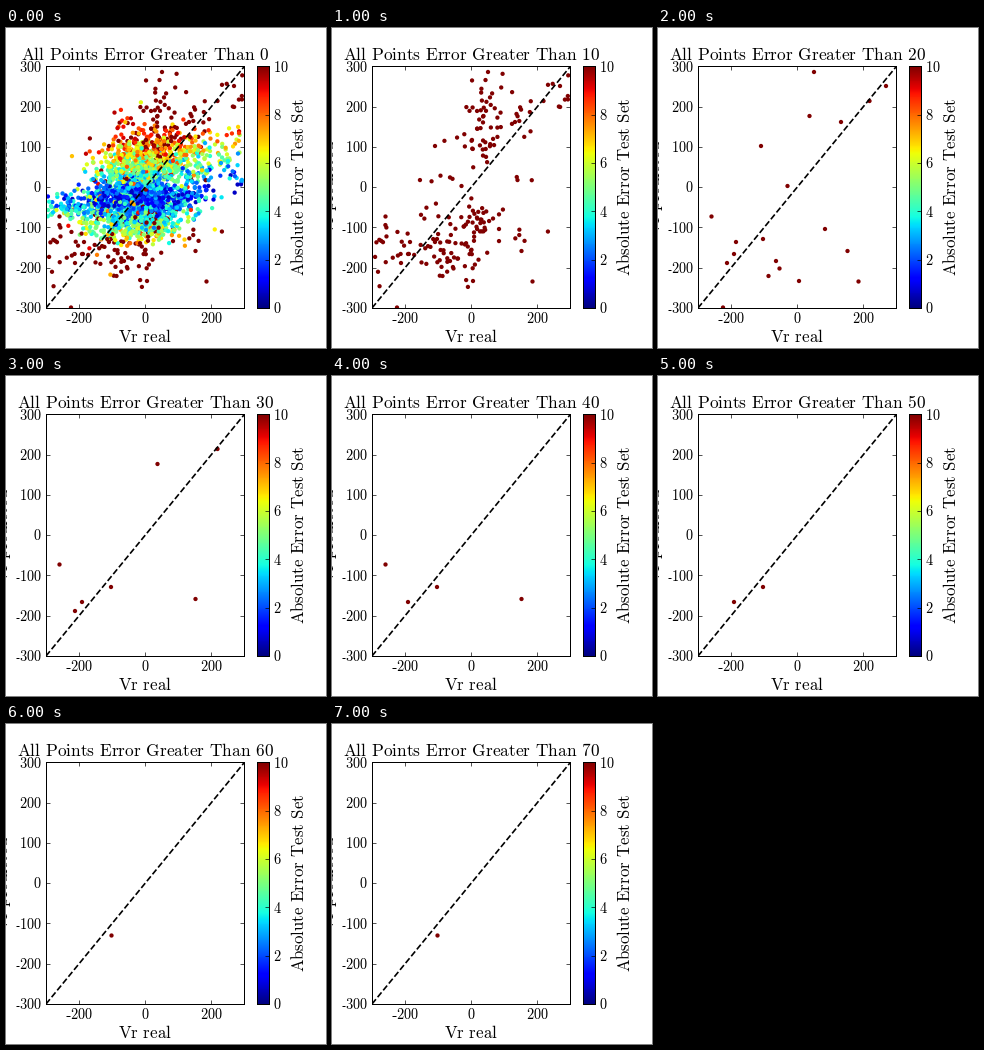
A matplotlib script that plays this animation: 320x320 px, repeating every 8000 ms.

```python
import numpy as np
import matplotlib.pyplot as plt
from matplotlib.animation import FuncAnimation
from matplotlib.lines import Line2D

SIZE = 320
PT = 72 / 80  # points per pixel
LEFT, RIGHT, TOP, BOTTOM = 40, 238.4, 38.4, 280
MID_X, MID_Y = (LEFT + RIGHT) / 2, (TOP + BOTTOM) / 2
BAR_LEFT, BAR_WIDTH = 251.2, 12.08
STEP = 10

plt.rcParams["mathtext.fontset"] = "cm"

# Key points in pixels, grouped by their error
KEY_POINTS = {
    75: [(105, 211)],
    55: [(76, 226)],
    45: [(53.5, 188.5), (189.5, 223)],
    35: [(151.5, 88), (211.5, 73), (69, 235)],
    25: [(156, 44), (228, 58), (183, 94), (103, 118), (129.5, 158),
         (78, 214), (118, 233), (121.5, 240.5), (110.5, 248), (141, 253),
         (167, 201), (200.5, 253.5), (65, 279.5)],
}

rng = np.random.default_rng(7)


def blob(n, x, sx, y, sy, slope=0):
    """Normal cloud whose centre line rises or falls with x."""
    px = rng.normal(x, sx, n)
    return np.column_stack([px, rng.normal(y, sy, n) + slope * (px - x)])


def strip(n, x0, x1, y, sy, slope=0):
    """Cloud spread evenly from x0 to x1."""
    px = rng.uniform(x0, x1, n)
    middle = (x0 + x1) / 2
    return np.column_stack([px, rng.normal(y, sy, n) + slope * (px - middle)])


def with_error(points, error):
    return np.column_stack([points, np.broadcast_to(error, len(points))])


def small_errors():
    points = np.vstack([
        blob(700, 139, 27, 169, 7),
        blob(850, 142, 27, 137, 17, -0.2),
        blob(560, 130, 25, 192, 11),
        strip(120, 41, 100, 181, 6),
        strip(90, 178, 237, 130, 19),
    ])
    x, y = points.T
    inside = (y > 90) & (y < 220) & (x > 41) & (x < 237)
    points = points[inside]
    x, y = points.T
    centre = 170 - 0.2 * np.maximum(x - 170, 0)
    error = 1.4 + np.abs(y - centre) / 8.5 + 0.02 * np.maximum(100 - x, 0)
    error += rng.normal(0, 1.3, len(x))
    return with_error(points, np.clip(error, 0.6, 9.9))


def medium_errors():
    return np.vstack([
        strip(24, 165, 237, 84, 14, -0.45),
        blob(24, 147, 13, 116, 10),
        blob(22, 149, 9, 82, 18),
        strip(9, 80, 200, 153, 6),
        blob(30, 146, 12, 190, 9),
        blob(46, 128, 21, 222, 17),
        strip(32, 42, 108, 217, 25),
        strip(6, 165, 230, 210, 12),
    ])


def build_points():
    fringe = blob(90, 136, 34, 155, 38, -0.2)
    return rng.permutation(np.vstack([
        small_errors(),
        with_error(fringe, rng.uniform(6, 9.9, len(fringe))),
        with_error(medium_errors(), 15),
        *[with_error(group, error) for error, group in KEY_POINTS.items()],
    ]))


def roman(text):
    return r"$\mathrm{" + text.replace(" ", r"\hspace{0.38}") + "}$"


def label(x, y, text, size, ha="center", rotation=0):
    return fig.text(x / SIZE, 1 - y / SIZE, roman(text), fontsize=size * PT,
                    ha=ha, va="baseline", rotation=rotation,
                    rotation_mode="anchor")


def number(x, y, value, ha, size=14.4):
    """Tick label with a short hyphen for negative values."""
    hyphen = size / 3
    if value < 0 and ha == "center":
        x += hyphen / 2
    label(x, y, str(abs(value)), size, ha)
    if value < 0:
        width = 1.5 * size
        start = x - (width if ha == "right" else width / 2) - hyphen
        level = 1 - (y - 0.216 * size) / SIZE
        fig.add_artist(Line2D(
            [(start + 0.1) / SIZE, (start + 0.8 * hyphen) / SIZE],
            [level, level], color="black", lw=PT, solid_capstyle="butt"))


def box(left, width):
    axes = fig.add_axes([left / SIZE, 1 - BOTTOM / SIZE,
                         width / SIZE, (BOTTOM - TOP) / SIZE])
    for spine in axes.spines.values():
        spine.set_linewidth(PT)
    axes.tick_params(direction="in", length=4, width=0.6,
                     labelleft=False, labelright=False, labelbottom=False)
    return axes


fig = plt.figure(figsize=(4, 4), dpi=80, facecolor="white")

ax = box(LEFT, RIGHT - LEFT)
ax.set_xlim(LEFT, RIGHT)
ax.set_ylim(BOTTOM, TOP)
ax.tick_params(top=True, right=True)

x_values = range(-200, 201, 200)
y_values = range(-300, 301, 100)
x_ticks = [MID_X + v * (RIGHT - LEFT) / 600 for v in x_values]
y_ticks = [MID_Y - v * (BOTTOM - TOP) / 600 for v in y_values]
ax.set_xticks(x_ticks)
ax.set_yticks(y_ticks)
for x, v in zip(x_ticks, x_values):
    number(x, 295, v, "center")
for y, v in zip(y_ticks, y_values):
    number(36, y + 5.2, v, "right")

# Colour bar
bar = box(BAR_LEFT, BAR_WIDTH)
bar.imshow(np.linspace(0, 10, 256)[:, None], cmap="jet", origin="lower",
           extent=(0, 1, 0, 10), aspect="auto")
bar.set_xticks([])
bar.set_yticks(range(0, 11, 2))
bar.tick_params(left=False, right=True)
for v in range(0, 11, 2):
    number(267, BOTTOM - v * (BOTTOM - TOP) / 10 + 5.2, v, "left")

label(MID_X, 314, "Vr real", 16.9)
label(2, MID_Y, "Vr predicted", 16.9, rotation=90)
label(298, MID_Y, "Absolute Error Test Set", 16.8, rotation=90)
title = label(MID_X, 32, "", 17.3)

points = build_points()
dots = ax.scatter([], [], s=(4.3 * PT) ** 2, c=[], cmap="jet",
                  vmin=0, vmax=10, linewidths=0, zorder=2)
ax.plot([LEFT, RIGHT], [BOTTOM, TOP], "k--", lw=1.5, zorder=3)


def draw(frame):
    limit = frame * STEP
    shown = points[points[:, 2] > limit]
    dots.set_offsets(shown[:, :2])
    dots.set_array(shown[:, 2])
    title.set_text(roman(f"All Points Error Greater Than {limit}"))
    return dots, title


anim = FuncAnimation(fig, draw, frames=8, interval=1000, repeat=True)
plt.show()
```
